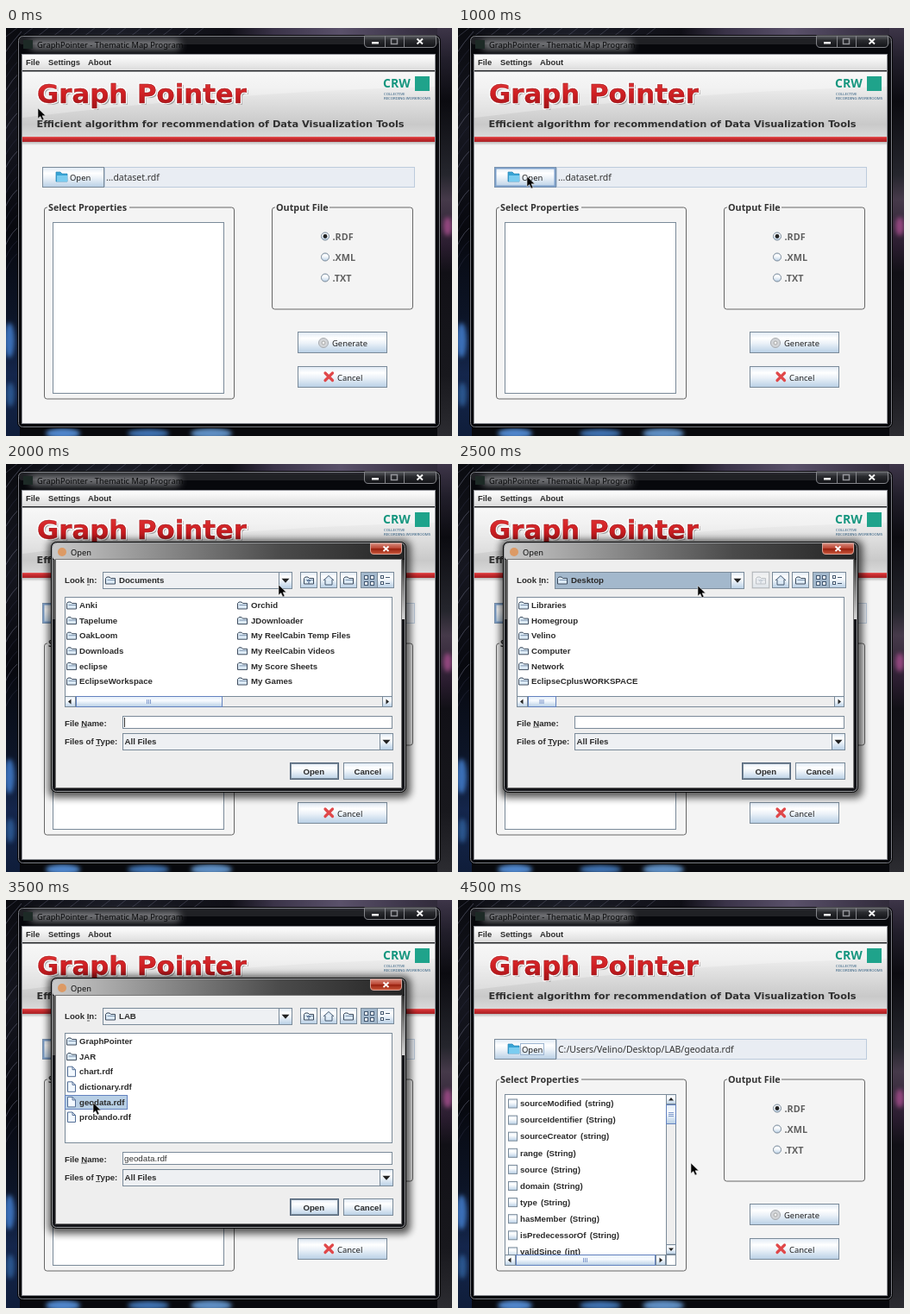
Animation of 517x473 px, one loop 5000 ms. Source, as an HTML page:

```html
<!DOCTYPE html>
<html lang="en">
<head>
<meta charset="utf-8">
<title>File chooser demo</title>
<style>
html, body { margin: 0; width: 100%; height: 100%; overflow: hidden; background: #08090d; }
svg { display: block; width: 517px; height: 473px; }
text { white-space: pre; }
.metal { font: bold 9.65px "Liberation Sans", Arial, sans-serif; fill: #2b2b2b; }
.menu { font: bold 9.4px "Liberation Sans", Arial, sans-serif; fill: #2b2b2b; }
.plain { font: 9.8px "Liberation Sans", Arial, sans-serif; fill: #333; }
.ui { font: 9.45px "Noto Sans", sans-serif; fill: #222; }
.field { font: 10.45px "Noto Sans", sans-serif; fill: #333; }
.head { font: bold 10.8px "Noto Sans", sans-serif; fill: #333; }
.title { font: 9.3px "Noto Sans", sans-serif; }
.wide { font-family: "DejaVu Sans", sans-serif; font-weight: bold; }
</style>
</head>
<body>
<svg id="stage" viewBox="0 0 517 473" xmlns="http://www.w3.org/2000/svg"></svg>
<script>
const EDGE = '#7a8a99', BLUE = '#6382bf', PALE = '#b8cfe5';
const STEP = 500;

// view, pointer x, pointer y, extra detail
const steps = [
  ['main', 37, 93], ['main', 58, 132], ['main', 80, 172, 'hover'],
  ['documents', 130, 170], ['documents', 316, 140],
  ['desktop', 278, 141], ['desktop', 190, 200],
  ['lab', 101, 235], ['lab', 357, 355, 'tip'], ['loaded', 270, 305]
];

const rect = (x, y, w, h, fill, stroke = 'none', more = '') =>
  `<rect x="${x}" y="${y}" width="${w}" height="${h}" fill="${fill}" stroke="${stroke}" ${more}/>`;
const path = (d, fill, stroke = 'none', more = '') =>
  `<path d="${d}" fill="${fill}" stroke="${stroke}" ${more}/>`;
const text = (x, y, s, cls, more = '') => `<text x="${x}" y="${y}" class="${cls}" ${more}>${s}</text>`;
const dot = (x, y, r, fill, stroke = 'none') =>
  `<circle cx="${x}" cy="${y}" r="${r}" fill="${fill}" stroke="${stroke}"/>`;
const glow = (x, y, rx, ry, fill) =>
  `<ellipse cx="${x}" cy="${y}" rx="${rx}" ry="${ry}" fill="${fill}" filter="url(#blur)"/>`;
const group = (name, body) => `<g data-on="${name}">${body}</g>`;
const times = (n, fn) => Array.from({ length: n }, (_, i) => fn(i)).join('');
const gradient = (id, stops, across) =>
  `<linearGradient id="${id}" x2="${across ? 1 : 0}" y2="${across ? 0 : 1}">` +
  stops.map(([at, c]) => `<stop offset="${at}" stop-color="${c}"/>`).join('') + '</linearGradient>';
const button = (x, y, w, h, stroke = EDGE) => rect(x + .5, y + .5, w - 1, h - 1, 'url(#ocean)', stroke);
const arrow = (x, y, turn, size = 3) =>
  path(`M${-size} ${-size / 2}H${size}L0 ${size / 2 + .5}Z`, '#222', 'none', `transform="translate(${x} ${y}) rotate(${turn})"`);

const defs = `<defs>
${gradient('ocean', [[0, '#dfe9f4'], [.3, '#fff'], [.55, '#eaf1f8'], [1, '#b8cfe5']])}
${gradient('thumb', [[0, '#e4eef8'], [.4, '#f8fbff'], [1, '#b8cfe5']])}
${gradient('menu', [[0, '#fff'], [1, '#dcdcdc']])}
${gradient('banner', [[0, '#f4f4f4'], [.25, '#ececec'], [.8, '#c9c9c9'], [1, '#dadada']])}
${gradient('ruby', [[0, '#e23b3b'], [.5, '#cf1f23'], [1, '#a01216']])}
${gradient('stripe', [[0, '#e86060'], [.3, '#cf2d30'], [1, '#a92226']])}
${gradient('fade', [[0, '#b9b9b9'], [1, '#f4f4f4']])}
${gradient('glass', [[0, '#5b5d62'], [.4, '#2a2b2f'], [1, '#111216']])}
${gradient('dialogBar', [[0, '#c9c9c9'], [.3, '#8d8d8d'], [.65, '#4a4a4a'], [1, '#252525']], true)}
${gradient('sheen', [[0, '#333'], [.4, '#777'], [1, '#d8d8d8']])}
${gradient('closeRed', [[0, '#d98a7c'], [.48, '#b8412f'], [.5, '#97200f'], [1, '#cc5a3d']])}
${gradient('left', [[0, '#0a0b10'], [.25, '#15161f'], [.5, '#07080e'], [.7, '#0c1426'], [.85, '#14264c'], [1, '#0f1d3a']])}
${gradient('right', [[0, '#3d3548'], [.08, '#211e2a'], [.18, '#0b0b10'], [.36, '#25262d'], [.42, '#463a4a'], [.53, '#2b1d30'], [.6, '#111016'], [.85, '#18181d'], [1, '#2c2c31']])}
${gradient('top', [[0, '#0b0c12'], [.25, '#1b1d27'], [.5, '#0f0f16'], [.6, '#3a3348'], [.75, '#5a516a'], [.9, '#3c3548'], [1, '#2c2734']], true)}
<filter id="blur" x="-60%" y="-60%" width="220%" height="220%"><feGaussianBlur stdDeviation="2.5"/></filter>
<filter id="soft" x="-10%" y="-10%" width="120%" height="120%"><feGaussianBlur stdDeviation="4"/></filter>
<filter id="haze" x="-20%" y="-80%" width="140%" height="260%"><feGaussianBlur stdDeviation="4"/></filter>
<clipPath id="rows">${rect(55, 226, 186, 185, '#000')}</clipPath>
</defs>`;

const backdrop = rect(0, 0, 517, 473, '#08090d') +
  rect(0, 0, 517, 12, 'url(#top)') + rect(0, 0, 16, 473, 'url(#left)') + rect(500, 0, 17, 473, 'url(#right)') +
  times(18, i => path(`M-2 ${30 + i * 15}Q7 ${16 + i * 14.5} 18 ${4 + i * 15}`, 'none', i % 3 ? '#2c2e42' : '#6a6c80', 'stroke-width=".9" opacity=".6"')) +
  times(13, i => path(`M${i * 18} 10Q${8 + i * 18} 4 ${14 + i * 18} -1`, 'none', '#666980', 'stroke-width=".8" opacity=".5"')) +
  glow(512, 230, 5, 11, '#93477f') + glow(4, 362, 6, 20, '#3a6fb8') + glow(5, 425, 5, 14, '#2b568f') +
  glow(66, 470, 20, 6, '#4f86cc') + glow(165, 470, 24, 5, '#3f73b4') + glow(238, 470, 24, 6, '#5e8fc4');

function symbolButtons() {
  return path('M415.5 9V18Q415.5 22.5 420 22.5H494Q498.5 22.5 498.5 18V9Z', 'url(#glass)', '#85868b') +
    path('M439.5 9V22M461.5 9V22', 'none', '#85868b') +
    rect(424, 16, 8, 2.5, '#f2f2f2') +
    rect(446.5, 12.5, 7, 6, 'none', '#94959a', 'stroke-width="1.5"') +
    path('M476.5 12.5L483 18.5M483 12.5L476.5 18.5', 'none', '#f4f4f4', 'stroke-width="2"');
}

function frame() {
  return rect(13.5, 8.5, 490, 455, '#07080c', '#000', 'rx="6" opacity=".88"') +
    rect(14.5, 9.5, 488, 453, 'none', '#7b7d84', 'rx="5"') +
    rect(15, 10, 487, 9, '#fff', 'none', 'rx="4" opacity=".1"') +
    rect(28, 14, 174, 11, '#a7a9ac', 'none', 'rx="5" filter="url(#haze)" opacity=".72"') +
    rect(20, 14, 11, 10, '#1d2a26') +
    text(36, 22.5, 'GraphPointer - Thematic Map Program', 'title', 'fill="#08090a"') + symbolButtons() +
    rect(18.5, 30.5, 479, 428, '#f4f4f4', '#8c8e94');
}

function banner() {
  const name = (dx, dy, fill, more = '') =>
    text(36 + dx, 87 + dy, 'Graph Pointer', 'wide', `font-size="30.8" fill="${fill}" ${more}`);
  return rect(19, 31, 478, 18, 'url(#menu)') +
    text(23, 43, 'File', 'menu') + text(49, 43, 'Settings', 'menu') + text(95, 43, 'About', 'menu') +
    rect(19, 50, 478, 77, 'url(#banner)') + rect(19, 49, 478, 1.5, '#25272a') +
    path('M19 51H497V68Q260 74 19 104Z', '#fff', 'none', 'opacity=".28"') +
    name(2, 2, '#777', 'opacity=".65"') + name(0, 0, '#fff', 'stroke="#fff" stroke-width="3" stroke-linejoin="round"') +
    name(0, 0, 'url(#ruby)', 'stroke="#8d1518" stroke-width=".4"') +
    text(35.5, 114.5, 'Efficient algorithm for recommendation of Data Visualization Tools', 'wide', 'font-size="11.35" fill="#303030"') +
    text(437, 69, 'CRW', 'title', 'style="font-size:14px;font-weight:bold" fill="#16967f"') +
    rect(474, 56, 17, 17, '#1fa38b') +
    text(438, 77.5, 'COLLECTIVE', 'title', 'style="font-size:4.3px" fill="#27577c"') +
    text(438, 83, 'RECORDING WORKROOMS', 'title', 'style="font-size:4.3px" fill="#27577c"') +
    rect(19, 126, 478, 6, 'url(#stripe)') + rect(19, 132, 478, 4, 'url(#fade)');
}

function titledBox(x, w, h, label, gap) {
  return rect(x + .5, 208, w, h, 'none', '#666', 'rx="3"') +
    rect(x + 4, 205, gap, 6, '#f4f4f4') + text(x + 5, 211.5, label, 'head');
}

function radio(label, i) {
  const y = 241.5 + i * 24;
  return dot(370, y, 4.5, 'url(#ocean)', EDGE) + (i ? '' : dot(370, y, 2.4, '#222')) +
    text(378.5, y + 4, label, 'head', 'style="fill:#606060"');
}

function form() {
  return button(42, 161, 72, 24) +
    path('M58 167H63L65 169H71V178H58Z', '#38a4d5', '#2685b5', 'stroke-width=".7"') +
    path('M59 171H71V178H59Z', '#7accf0') + text(74, 177, 'Open', 'ui') +
    rect(114.5, 161.5, 359, 23, '#e9edf3', '#bccbdc') +
    titledBox(44, 220, 222, 'Select Properties', 95) + rect(54.5, 225.5, 198, 198, '#fff', EDGE) +
    titledBox(308, 163, 118, 'Output File', 63) + ['.RDF', '.XML', '.TXT'].map(radio).join('') +
    button(338, 352, 104, 25) + dot(368, 365, 5.5, '#d3d5d8', '#a7abb0') + dot(368, 365, 2, '#f1f1f1', '#aaa') +
    text(378, 368.5, 'Generate', 'ui') +
    button(338, 392, 104, 25) + path('M370 400L378.5 408.5M378.5 400L370 408.5', 'none', '#e0484a', 'stroke-width="3.2" stroke-linecap="round"') +
    text(384, 408.5, 'Cancel', 'ui');
}

function properties() {
  const names = ['sourceModified (string)', 'sourceIdentifier (String)', 'sourceCreator (string)', 'range (String)',
    'source (String)', 'domain (String)', 'type (String)', 'hasMember (String)', 'isPredecessorOf (String)', 'validSince (int)'];
  const rows = names.map((s, i) => {
    const y = 236 + i * 19.1;
    return rect(58.5, y - 5, 10, 10, 'url(#ocean)', EDGE) + text(72, y + 3.2, s, 'metal', 'word-spacing="1.5"');
  }).join('');
  return `<g clip-path="url(#rows)">${rows}</g>` +
    rect(241.5, 225.5, 11, 186, '#eee', EDGE) + button(241, 225, 12, 12) + button(241, 399, 12, 12) +
    arrow(247, 231, 180) + arrow(247, 405, 0) + rect(241.5, 237.5, 11, 22, 'url(#thumb)', BLUE) +
    path('M244 246.5H250M244 248.5H250M244 250.5H250', 'none', BLUE, 'stroke-width=".8"') +
    rect(54.5, 411.5, 187, 12, '#eee', EDGE) + button(54, 411, 13, 13) + button(229, 411, 12, 13) +
    arrow(60, 417.5, 90) + arrow(235, 417.5, -90) + rect(67.5, 411.5, 161, 12, 'url(#thumb)', BLUE) +
    path('M145.5 415V420M147.5 415V420M149.5 415V420', 'none', BLUE, 'stroke-width=".8"');
}

const folder = (x, y) =>
  path(`M${x + .5} ${y + 4}V${y - 2.5}L${x + 2} ${y - 4}H${x + 5}L${x + 6.5} ${y - 2.5}H${x + 11.5}V${y + 4}Z`, '#dceaf6', '#3c4a5c') +
  path(`M${x + 2.5} ${y - .5}H${x + 11}`, 'none', '#7d94ae');
const sheet = (x, y) => path(`M${x + 1.5} ${y - 6}H${x + 7}L${x + 10.5} ${y - 2.5}V${y + 5.5}H${x + 1.5}Z`, '#f2f8ff', '#536e96') +
  path(`M${x + 7} ${y - 6}V${y - 2.5}H${x + 10.5}`, 'none', '#536e96');

function files(names, x = 70) {
  return names.map((s, i) => {
    const y = 164 + i * 17.6;
    return (s.includes('.') ? sheet : folder)(x, y) + text(x + (x > 70 ? 16 : 15), y + 3.2, s, 'metal');
  }).join('');
}

function scrollBar(w) {
  const mid = 81 + w / 2;
  return rect(68.5, 269.5, 379, 12, '#eee', EDGE) + button(68, 269, 13, 13) + button(436, 269, 12, 13) +
    arrow(74, 275.5, 90) + arrow(442, 275.5, -90) + rect(81.5, 269.5, w, 12, 'url(#thumb)', BLUE) +
    path(`M${mid - 2} 273V278M${mid} 273V278M${mid + 2} 273V278`, 'none', BLUE, 'stroke-width=".8"');
}

function toolbar() {
  const tiles = [[415, 129], [422, 129], [415, 136], [422, 136]];
  return [341, 364, 387, 430].map(x => button(x, 125, 20, 19)).join('') +
    rect(411.5, 125.5, 19, 18, '#a3b8cc', EDGE) + folder(345, 135) + path('M351 139V134M349 136L351 134L353 136', 'none', '#445f84') +
    path('M368 135L374 129.5L380 135M370 134V140H378V134', '#dceaf6', '#43576f') + folder(391, 135) +
    tiles.map(([x, y]) => rect(x + .5, y + .5, 4, 4, '#edf5fc', '#43576f')).join('') +
    rect(434.5, 129.5, 3, 3, '#fff', '#43576f') + rect(434.5, 136.5, 3, 3, '#fff', '#43576f') +
    path('M440 131.5H445M440 138.5H445', 'none', '#43576f');
}

function combo(x, y, w) {
  return rect(x + .5, y + .5, w - 1, 19, '#eef0f3', EDGE) + button(x + w - 16, y, 16, 20) + arrow(x + w - 8, y + 10, 0, 4.5);
}

function dialog() {
  return rect(49, 88, 420, 299, '#000', 'none', 'rx="8" filter="url(#soft)" opacity=".65"') +
    rect(52.5, 90.5, 411, 290, '#15161a', '#0a0a0a', 'rx="6"') +
    rect(54, 92, 408, 19, 'url(#dialogBar)', 'none', 'rx="4"') +
    rect(54, 111, 4, 69, '#555') + rect(459, 111, 4, 69, 'url(#sheen)') +
    rect(53.5, 91.5, 409, 288, 'none', '#9a9c9f', 'rx="5"') +
    dot(65, 102, 5, '#dc9a65') + text(75, 105.5, 'Open', 'title', 'fill="#111"') +
    path('M422.5 92V101Q422.5 104.5 426 104.5H455Q458.5 104.5 458.5 101V92Z', 'url(#closeRed)', '#d9a49a') +
    path('M437.5 95.5L443.5 101M443.5 95.5L437.5 101', 'none', '#fff', 'stroke-width="1.8"') +
    rect(57.5, 110.5, 401, 265, '#eee', '#777') +
    text(68, 138, 'Look In:', 'metal') + path('M94 140H97', 'none', '#333', 'stroke-width=".8"') +
    combo(112, 125, 220) + toolbar() + rect(68.5, 154.5, 379, 127, '#fff', EDGE) +
    text(68, 303.5, 'File Name:', 'metal') + path('M87 305H94', 'none', '#333', 'stroke-width=".8"') +
    rect(135.5, 292.5, 312, 14, '#fff', EDGE) +
    text(68, 325, 'Files of Type:', 'metal') + path('M104 326.5H109', 'none', '#333', 'stroke-width=".8"') +
    combo(135, 312, 314) + text(137.5, 325, 'All Files', 'metal') +
    button(329, 346, 57, 20, '#52657b') + rect(330.5, 347.5, 54, 17, 'none', EDGE) + text(344.5, 359.5, 'Open', 'metal') +
    button(391, 346, 58, 20) + text(403.5, 359.5, 'Cancel', 'metal');
}

const place = name => folder(115, 135) + text(131, 138, name, 'metal');

document.getElementById('stage').innerHTML = defs + backdrop + frame() + banner() + form() +
  group('main documents desktop lab', text(116, 176.5, '...dataset.rdf', 'field')) +
  group('hover documents desktop lab', rect(43.5, 162.5, 69, 21, 'none', '#7c9fca', 'stroke-width="2"')) +
  group('loaded', text(116, 176.5, 'C:/Users/Velino/Desktop/LAB/geodata.rdf', 'field') +
    rect(72.5, 166.5, 27, 13, 'none', '#9eb6d2') + properties()) +
  group('documents desktop lab', dialog()) +
  group('documents', place('Documents') +
    files(['Anki', 'Tapelume', 'OakLoom', 'Downloads', 'eclipse', 'EclipseWorkspace']) +
    files(['Orchid', 'JDownloader', 'My ReelCabin Temp Files', 'My ReelCabin Videos', 'My Score Sheets', 'My Games'], 268) +
    scrollBar(169) + path('M137.5 294V305', 'none', '#333')) +
  group('desktop', rect(113, 126, 203, 18, '#a3b8cc') + place('Desktop') +
    rect(341, 125, 20, 19, '#eee', '#bbb', 'opacity=".72"') +
    files(['Libraries', 'Homegroup', 'Velino', 'Computer', 'Network', 'EclipseCplusWORKSPACE']) + scrollBar(32)) +
  group('lab', place('LAB') + rect(68.5, 226.5, 72, 16, PALE, BLUE) +
    files(['GraphPointer', 'JAR', 'chart.rdf', 'dictionary.rdf', 'geodata.rdf', 'probando.rdf']) +
    text(137, 303, 'geodata.rdf', 'plain')) +
  group('tip', rect(329.5, 346.5, 56, 19, 'none', '#40566f') + rect(356.5, 371.5, 85, 12, PALE, BLUE) +
    text(359.5, 381, 'Open selected file', 'plain')) +
  `<g id="pointer">${path('M0 0V12L2.8 9.5L4.9 14L7 13L5 8.8H9Z', '#000', '#ddd', 'stroke-width=".6"')}</g>`;

const layers = [...document.querySelectorAll('[data-on]')].map(el => [el, el.dataset.on.split(' ')]);
const pointer = document.getElementById('pointer');
const start = performance.now();
let shown = -1;

function play() {
  const index = Math.floor((performance.now() - start) / STEP) % steps.length;
  if (index !== shown) {
    const [view, x, y, detail] = steps[shown = index];
    for (const [el, on] of layers) el.style.display = on.includes(view) || on.includes(detail) ? '' : 'none';
    pointer.setAttribute('transform', `translate(${x} ${y})`);
  }
  requestAnimationFrame(play);
}
play();
</script>
</body>
</html>
```
